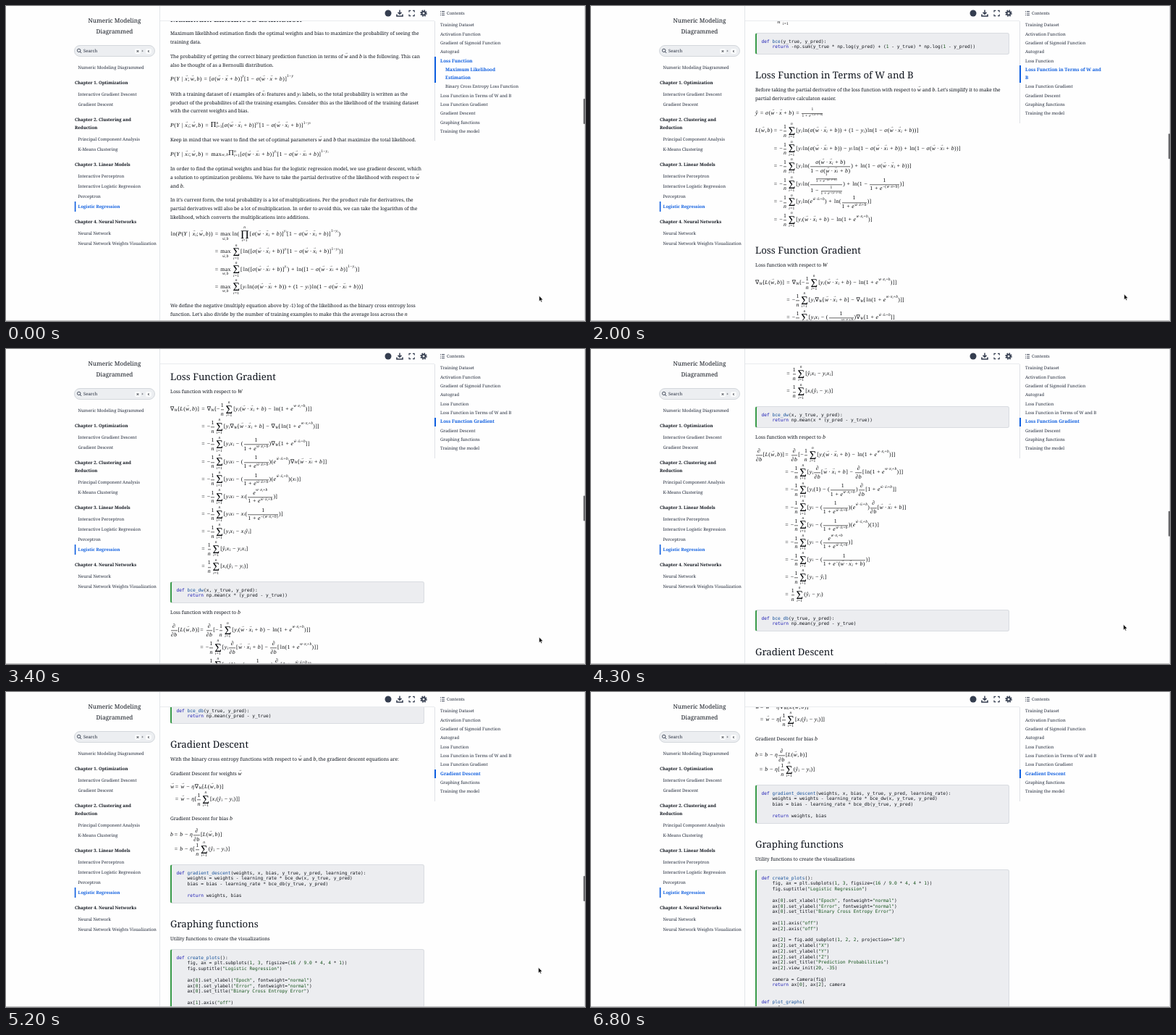
An HTML page for the animation above (6.9 s loop, 800x435 px).

```html
<!DOCTYPE html>
<html lang="en">
<head>
<meta charset="utf-8">
<title>Numeric Modeling Diagrammed</title>
<style>
html, body { margin: 0; width: 100%; height: 100%; overflow: hidden; background: #fff; }
#stage { position: relative; width: 800px; height: 435px; overflow: hidden; background: #fefefe;
  font: 6.65px "Noto Serif", serif; color: #10151e; text-rendering: geometricPrecision; }
#stage div, #stage svg { position: absolute; }
.line { line-height: 12px; white-space: nowrap; }
.h2 { font-size: 13.2px; }
.h3 { font-size: 11.6px; }
.side { font-size: 5.95px; color: #252d3d; }
.chapter { font-size: 6.05px; font-weight: bold; }
.title { font-size: 8.2px; left: 95px; width: 110px; text-align: center; }
.active { color: #0b5cdf; font-weight: bold; }
.code { left: 227px; width: 351px; box-sizing: border-box; margin: 0; padding: 7.6px 0 0 6.5px; position: absolute;
  font: 6.22px/7.78px "DejaVu Sans Mono", monospace; color: #101319; background: #ecedf0;
  border: 1px solid #d9dce1; border-left: 2px solid #3a9b4a; border-radius: 3px; }
.kw { color: #1c1cb4; } .fn { color: #14509a; } .lit { color: #14521a; }
#clip { left: 213px; top: 21px; width: 379px; height: 414px; overflow: hidden; }
#page { left: -213px; top: -21px; }
#toc { left: 592px; top: 20.6px; width: 150px; padding-bottom: 7px; border-left: 1px solid #dfe2e7; }
#toc p { position: relative; margin: 0; padding: .7px 0 .7px 7px; line-height: 10.95px; font-size: 5.95px; white-space: nowrap; color: #252d3d; }
#toc p.child { padding-left: 14px; }
#toc p.active { color: #0b5cdf; font-size: 6.35px; }
#toc p.active::before { content: ""; position: absolute; left: -1px; top: 0; bottom: 0; width: 1.6px; background: #0b5cdf; }
.kbd { font: 4px/7px "DejaVu Sans", sans-serif; height: 7px; width: 8px; text-align: center; background: #fafbfc; border-radius: 2px; }

.math, .row { display: inline-flex; align-items: center; white-space: nowrap; }
.math { font: 7.8px/1 "Liberation Serif", serif; letter-spacing: .04em; color: #05070a; }
.line .math { height: 1em; letter-spacing: 0; }
#stage div.math { transform: translateY(-50%); }
.var { font-style: italic; letter-spacing: .06em; position: relative; }
.line .var:last-child { letter-spacing: 0; }
.vec::before { content: "→"; position: absolute; left: 50%; top: -.42em; transform: translateX(-42%);
  font: bold .62em/1 "Liberation Serif", serif; letter-spacing: 0; }
.op { margin: 0 .3em; } .rel { margin: 0 .35em; } .dot { margin: 0 .2em; } .fun { margin-left: .1em; }
.sup, .sub { font-size: .7em; position: relative; display: inline-flex; align-items: center; }
.sup { top: -.55em; } .sub { top: .42em; }
.sup .sub { top: .25em; }
.pair { display: inline-flex; flex-direction: column; align-items: flex-start; }
.pair .sup, .pair .sub { top: 0; }
.sup .op, .sub .op, .sub .rel, .sup .dot, .lim .rel, .pair .rel { margin: 0; }
.frac { display: inline-flex; flex-direction: column; align-items: center; position: relative; top: .09em; margin: 0 .12em; }
.frac > span { display: inline-flex; align-items: center; padding-bottom: .18em; }
.frac > span + span { border-top: 1px solid #666; padding: .18em 0 0; }
.frac > span + span .sup { top: -.3em; }
.frac .frac, .small .frac { font-size: .7em; }
.big { position: relative; top: .09em; margin: 0 .14em 0 .2em; display: inline-flex; }
.big > b { font: 2.1em/.72em "Liberation Serif", serif; letter-spacing: 0; }
.prod { font-size: 1.35em; letter-spacing: 0; }
.lim { position: absolute; left: 50%; font-size: .7em; transform: translateX(-50%); display: inline-flex; align-items: center; }
.over { bottom: calc(100% + .02em); } .under { top: calc(100% + .12em); }
.max { position: relative; margin: 0 .17em 0 0; }
</style>
</head>
<body>
<div id="stage">
  <div id="clip"><div id="page"></div></div>
  <div style="left:213px;top:20px;width:379px;height:1px;background:#e9ebee"></div>
  <div style="left:212px;top:0;width:1px;height:435px;background:#e3e5e9"></div>
  <div id="nav"></div>
  <div style="left:94px;top:54px;width:110px;height:14px;border:1px solid #d3d7dc;border-radius:8px;background:#eceef1"></div>
  <div class="line side" style="left:107px;top:56px">Search</div>
  <div class="kbd" style="left:178px;top:58.5px">⌘</div>
  <div class="line" style="left:187px;top:56px;font-size:5.5px">+</div>
  <div class="kbd" style="left:193px;top:58.5px">K</div>
  <div class="line side" style="left:609px;top:4px">Contents</div>
  <div id="toc"></div>
  <svg width="800" height="435" fill="none" stroke="#343d4f" stroke-width="1.2">
    <circle cx="528" cy="10" r="4.5" fill="#343d4f" stroke="none"/>
    <path d="M544 5.5V11M541.5 8.8 544 11.3 546.5 8.8" stroke-width="1.5"/>
    <path d="M540 11.5V14H548V11.5" stroke-width="1.6"/>
    <path d="M557 8.5V6.3H559.3M562 6.3H564.2V8.5M564.2 11.5V13.7H562M559.3 13.7H557V11.5"/>
    <circle cx="577" cy="10" r="3.9" stroke-dasharray="1.7 1.36" stroke-width="1.6"/>
    <circle cx="577" cy="10" r="2.4" stroke-width="1.8"/>
    <path d="M602 7.5H606M602 10H606M602 12.5H606M600 7.5H601M600 10H601M600 12.5H601" stroke-width=".9"/>
    <circle cx="100.7" cy="61.4" r="2.2" stroke-width=".9"/><path d="M102.3 63 104.2 65" stroke-width=".9"/>
    <path d="M95.6 270V284" stroke="#0b5cdf" stroke-width="1.6"/>
    <path d="M0 434.5H800" stroke="#bdbdbf" stroke-width="1"/>
    <path d="M799.5 0V435" stroke="#dcdcde" stroke-width="1"/>
    <rect id="thumb" x="797.8" width="2.2" height="35" rx="1" fill="#68686b" stroke="none"/>
    <path id="cursor" d="M0 0V7.4L1.7 5.9 2.8 8.6 4 8.1 2.9 5.5H5.2Z" fill="#000" stroke="#fff" stroke-width=".5"/>
  </svg>
</div>
<script>
const $ = id => document.getElementById(id);
const span = (cls, html) => `<span class="${cls}">${html}</span>`;

// Compact math notation: x' vector, @{a}{b} fraction, Σ Π with limits, π inline product, M max with limit.
function math(src) {
  const tokens = src.match(/ln|max|[a-zA-Z]'?|\S/g);
  let pos = 0;
  const sequence = () => {
    let out = "";
    while (pos < tokens.length && tokens[pos] !== "}") out += scripted();
    pos++;
    return out;
  };
  const limits = "<span class='lim over'><i>n</i></span><span class='lim under'><i>i</i>=1</span>";
  function atom() {
    const t = tokens[pos++];
    if (t === "{") return span("row", sequence());
    if (t === "@") { const top = atom(); return span("frac", `<span>${top}</span><span>${atom()}</span>`); }
    if (t === "Σ" || t === "Π") return span("big", `<b>${t}</b>${limits}`);
    if (t === "π") return span("prod", "Π");
    if (t === "M") return span("max", `max<span class="lim under">${span("var vec", "w")},${span("var", "b")}</span>`);
    if (t === "ln" || t === "max") return span("fun", t);
    if (t === "-") return span("", "−");
    if ("+−".includes(t)) return span("op", t);
    if ("=|".includes(t)) return span("rel", t);
    if (t === "·") return span("dot", t);
    if (/[;,]/.test(t)) return `<span style="margin-right:.12em">${t}</span>`;
    if (/[a-zA-Zŷση∂]/.test(t)) return span(t[1] ? "var vec" : "var", t[0]);
    return span("", t);
  }
  function scripted() {
    const base = atom();
    let sup = "", sub = "";
    while (tokens[pos] === "_" || tokens[pos] === "^") {
      if (tokens[pos++] === "^") sup = span("sup", atom()); else sub = span("sub", atom());
    }
    return base + (sup && sub ? span("pair", sup + sub) : sup + sub);
  }
  return sequence();
}

let html = "";
const inline = s => s.replace(/\$(.*?)\$/g, (_, m) => span("math small", math(m)));
const line = (y, text, cls = "", x = 227) =>
  html += `<div class="line ${cls}" style="left:${x}px;top:${y - 6}px">${inline(text)}</div>`;
const para = (y, ...lines) => lines.forEach((text, k) => line(y + k * 11.8, text));
const eq = (y, src, x = 227, cls = "") =>
  html += `<div class="math ${cls}" style="left:${x}px;top:${y - .7}px">${math(src)}</div>`;
const align = (x, lhs, ys, rows) => {
  eq(ys[0], lhs);
  rows.forEach((row, k) => eq(ys[k], "=" + row, x - 2.4));
};
const code = (y, h, text) => {
  const colored = text.replace(/("[^"]*"|\b\d+(?:\.\d+)?\b)|\b(def|return)\b|(?<=def )(\w+)/g,
    (m, lit, kw) => span(lit ? "lit" : kw ? "kw" : "fn", m));
  html += `<pre class="code" style="top:${y}px;height:${h}px">${colored}</pre>`;
};
const rows = (start, count, pitch = 24.15) => Array.from({ length: count }, (_, k) => start + k * pitch);

const z = "w'·x'_i+b", sig = `σ(${z})`, ez = `e^{${z}}`, mean = "@{1}{n}Σ", neg = "-" + mean;
const power = `[${sig}]^{y_i}`, power1 = `[1−${sig}]^{1−y_i}`;
const loss = `[y_iln(${sig})+(1−y_i)ln(1−${sig})]`;
const inv = `(@{1}{1+${ez}})`, logistic = "@{1}{1+e^{-(w'·x'+b)}}", db = "@{∂}{∂b}";

line(19, "Maximum Likelihood Estimation", "h3");
para(38.3, "Maximum likelihhod estimation finds the optimal weights and bias to maximize the probability of seeing the", "training data.");
para(70.3, "The probability of getting the correct binary prediction function in terms of $w'$ and $b$ is the following. This can",
  "also be thought of as a Bernoulli distribution.");
eq(102, "P(Y|x';w',b)=[σ(w'·x'+b)]^y[1−σ(w'·x'+b)]^{1−y}");
para(121.7, "With a training dataset of $i$ examples of $x'_i$ features and $y_i$ labels, so the total probability is written as the",
  "product of the probabilites of all the training examples. Consider this as the likelihood of the training dataset",
  "with the current weights and bias.");
eq(165.5, `P(Y|x'_i;w',b)=π_{i=1}^n${power}${power1}`);
para(185, "Keep in mind that we want to find the set of optimal parameters $w'$ and $b$ that maximize the total likelihood.");
eq(205, `P(Y|x'_i;w',b)=max_{w',b}π_{i=1}^n${power}${power1}`);
para(225, "In order to find the optimal weights and bias for the logistic regression model, we use gradient descent, which",
  "a solution to optimization problems. We have to take the partial derivative of the likelihood with respect to $w'$", "and $b$.");
para(268, "In it’s current form, the total probability is a lot of multiplications. Per the product rule for derivatives, the",
  "partial derivatives will also be a lot of multiplication. In order to avoid this, we can take the logarithm of the",
  "likelihood, which converts the multiplications into additions.");
align(288.5, "ln(P(Y|x'_i;w',b))", rows(316, 4), [`Mln(Π${power}${power1})`, `MΣ[ln(${power}${power1})]`,
  `MΣ[ln(${power})+ln(${power1})]`, `MΣ${loss}`]);
para(414.3, "We define the negative (multiply equation above by -1) log of the likelihood as the binary cross entropy loss",
  "function. Let’s also divide by the number of training examples to make this the average loss across the $n$", "examples.");
eq(462.5, `L(w',b)=${neg}${loss}`);

line(501, "Binary Cross Entropy Loss Function", "h3");
para(522, `Recall that $ŷ=σ(w'·x'+b)=${logistic}$`);
para(543, "To simplify the calculation of the loss, let’s rewrite it in terms of $ŷ$");
eq(567.5, `L(ŷ)=${neg}[y_iln(ŷ_i)+(1−y_i)ln(1−ŷ_i)]`);
code(588, 30, `def bce(y_true, y_pred):
    return -np.sum(y_true * np.log(y_pred) + (1 - y_true) * np.log(1 - y_pred))`);

line(646, "Loss Function in Terms of W and B", "h2");
para(667, "Before taking the partial derivative of the loss function with respect to $w'$ and $b$. Let’s simplify it to make the",
  "partial derivative calculaton easier.");
eq(699.5, `ŷ=σ(w'·x'+b)=${logistic}`, 227, "small");
align(252.5, "L(w',b)", rows(724, 6, 24.6), [neg + loss, `${neg}[y_iln(${sig})−y_iln(1−${sig})+ln(1−${sig})]`,
  `${neg}[y_iln(@{${sig}}{1−${sig}})+ln(1−${sig})]`, `${neg}[y_iln(@{${logistic}}{1−${logistic}})+ln(1−${logistic})]`,
  `${neg}[y_iln(${ez})+ln${inv}]`, `${neg}[y_i(${z})−ln(1+${ez})]`]);

line(888, "Loss Function Gradient", "h2");
para(909, "Loss function with respect to $W$");
align(270, "∇_W[L(w',b)]", rows(934, 10), [`∇_W[${neg}[y_i(${z})−ln(1+${ez})]]`, `${neg}[y_i∇_W[${z}]−∇_W[ln(1+${ez})]]`,
  `${neg}[y_ix_i−${inv}∇_W[1+${ez}]]`, `${neg}[y_ix_i−${inv}(${ez})∇_W[${z}]]`, `${neg}[y_ix_i−${inv}(${ez})(x_i)]`,
  `${neg}[y_ix_i−x_i(@{${ez}}{1+${ez}})]`, `${neg}[y_ix_i−x_i(@{1}{1+e^{-(${z})}})]`, `${neg}[y_ix_i−x_iŷ_i]`,
  `${mean}[ŷ_ix_i−y_ix_i]`, `${mean}[x_i(ŷ_i−y_i)]`]);
code(1171, 30, `def bce_dw(x, y_true, y_pred):
    return np.mean(x * (y_pred - y_true))`);
para(1214, "Loss function with respect to $b$");
align(268, `${db}[L(w',b)]`, rows(1239, 9), [`${db}[${neg}[y_i(${z})−ln(1+${ez})]]`, `${neg}[y_i${db}[${z}]−${db}[ln(1+${ez})]]`,
  `${neg}[y_i(1)−${inv}${db}[1+${ez}]]`, `${neg}[y_i−${inv}(${ez})${db}[${z}]]`, `${neg}[y_i−${inv}(${ez})(1)]`,
  `${neg}[y_i−(@{${ez}}{1+${ez}})]`, `${neg}[y_i−(@{1}{1+e^{-}(${z})})]`, `${neg}[y_i−ŷ_i]`, `${mean}(ŷ_i−y_i)`]);
code(1452, 30, `def bce_db(y_true, y_pred):
    return np.mean(y_pred - y_true)`);

line(1510, "Gradient Descent", "h2");
para(1531, "With the binary cross entropy functions with respect to $w'$ and $b$, the gradient descent equations are:");
para(1551, "Gradient Descent for weights $w'$");
align(233.5, "w'", [1570, 1587], ["w'−η∇_W[L(w',b)]", `w'−η[${mean}[x_i(ŷ_i−y_i)]]`]);
para(1612.5, "Gradient Descent for bias $b$");
align(232.5, "b", [1636, 1656], [`b−η${db}[L(w',b)]`, `b−η[${mean}(ŷ_i−y_i)]`]);
code(1676, 54, `def gradient_descent(weights, x, bias, y_true, y_pred, learning_rate):
    weights = weights - learning_rate * bce_dw(x, y_true, y_pred)
    bias = bias - learning_rate * bce_db(y_true, y_pred)

    return weights, bias`);

line(1758, "Graphing functions", "h2");
para(1779, "Utility functions to create the visualizations");
code(1793, 300, `def create_plots():
    fig, ax = plt.subplots(1, 3, figsize=(16 / 9.0 * 4, 4 * 1))
    fig.suptitle("Logistic Regression")

    ax[0].set_xlabel("Epoch", fontweight="normal")
    ax[0].set_ylabel("Error", fontweight="normal")
    ax[0].set_title("Binary Cross Entropy Error")

    ax[1].axis("off")
    ax[2].axis("off")

    ax[2] = fig.add_subplot(1, 2, 2, projection="3d")
    ax[2].set_xlabel("X")
    ax[2].set_ylabel("Y")
    ax[2].set_zlabel("Z")
    ax[2].set_title("Prediction Probabilities")
    ax[2].view_init(20, -35)

    camera = Camera(fig)
    return ax[0], ax[2], camera


def plot_graphs(
    ax0,`);
$("page").innerHTML = html;

html = '<div class="line title" style="top:15px">Numeric Modeling</div><div class="line title" style="top:29.7px">Diagrammed</div>';
const link = (y, text, cls = "") => line(y, text, "side " + cls, 99.5);
const chapter = (y, text) => line(y, text, "chapter", 95);
link(84.5, "Numeric Modeling Diagrammed");
chapter(105.5, "Chapter 1. Optimization");
link(121.5, "Interactive Gradient Descent");
link(135.5, "Gradient Descent");
chapter(157, "Chapter 2. Clustering and");
chapter(167.7, "Reduction");
link(183.5, "Principal Component Analysis");
link(197.7, "K-Means Clustering");
chapter(218.7, "Chapter 3. Linear Models");
link(234.5, "Interactive Perceptron");
link(248.7, "Interactive Logistic Regression");
link(263, "Perceptron");
link(277, "Logistic Regression", "active");
chapter(298, "Chapter 4. Neural Networks");
link(314, "Neural Network");
link(328, "Neural Network Weights Visualization");
$("nav").innerHTML = html;

// Label (| breaks the line when bold), heading position, and whether it is nested under Loss Function.
const sections = [["Training Dataset"], ["Activation Function"], ["Gradient of Sigmoid Function"], ["Autograd"],
  ["Loss Function"], ["Maximum Likelihood|Estimation", 19, true], ["Binary Cross Entropy Loss|Function", 501, true],
  ["Loss Function in Terms of W and|B", 646], ["Loss Function Gradient", 888], ["Gradient Descent", 1510],
  ["Graphing functions", 1758], ["Training the model"]];
let shown = -1;
function showContents(scroll) {
  const current = sections.findLastIndex(s => s[1] - scroll < 130);
  if (current === shown) return;
  shown = current;
  const nested = sections[current][2];
  $("toc").innerHTML = sections.map(([label, , child], k) => {
    if (child && !nested) return "";
    const active = k === current || (nested && k === 4);
    return `<p class="${child ? "child" : ""} ${active ? "active" : ""}">${label.replace("|", active ? "<br>" : " ")}</p>`;
  }).join("");
}

const scrollKeys = [[0, 0], [900, 0], [1200, 262], [2000, 551], [3400, 850], [4300, 1092], [5200, 1438], [5500, 1512], [6000, 1548], [6900, 1548]];
function scrollAt(t) {
  const k = scrollKeys.findIndex(key => key[0] > t);
  const [t0, s0] = scrollKeys[k - 1], [t1, s1] = scrollKeys[k];
  return Math.round(s0 + (s1 - s0) * (t - t0) / (t1 - t0));
}

function draw(now) {
  const t = Math.floor(now % 6900 / 100) * 100;
  const scroll = scrollAt(t);
  $("page").style.transform = `translateY(${-scroll}px)`;
  showContents(scroll);
  $("thumb").setAttribute("y", 128 + scroll * .0876);
  $("thumb").style.opacity = Math.min(1, Math.max(0, (6800 - t) / 300));
  const [x, y] = t < 700 ? [736.7, 400.3] : t < 3800 ? [736.7, 398] : [735.7, 380.5];
  $("cursor").setAttribute("transform", `translate(${x} ${y})`);
  $("cursor").style.opacity = t < 6000 ? 1 : 0;
  requestAnimationFrame(draw);
}
draw(performance.now());
</script>
</body>
</html>
```
